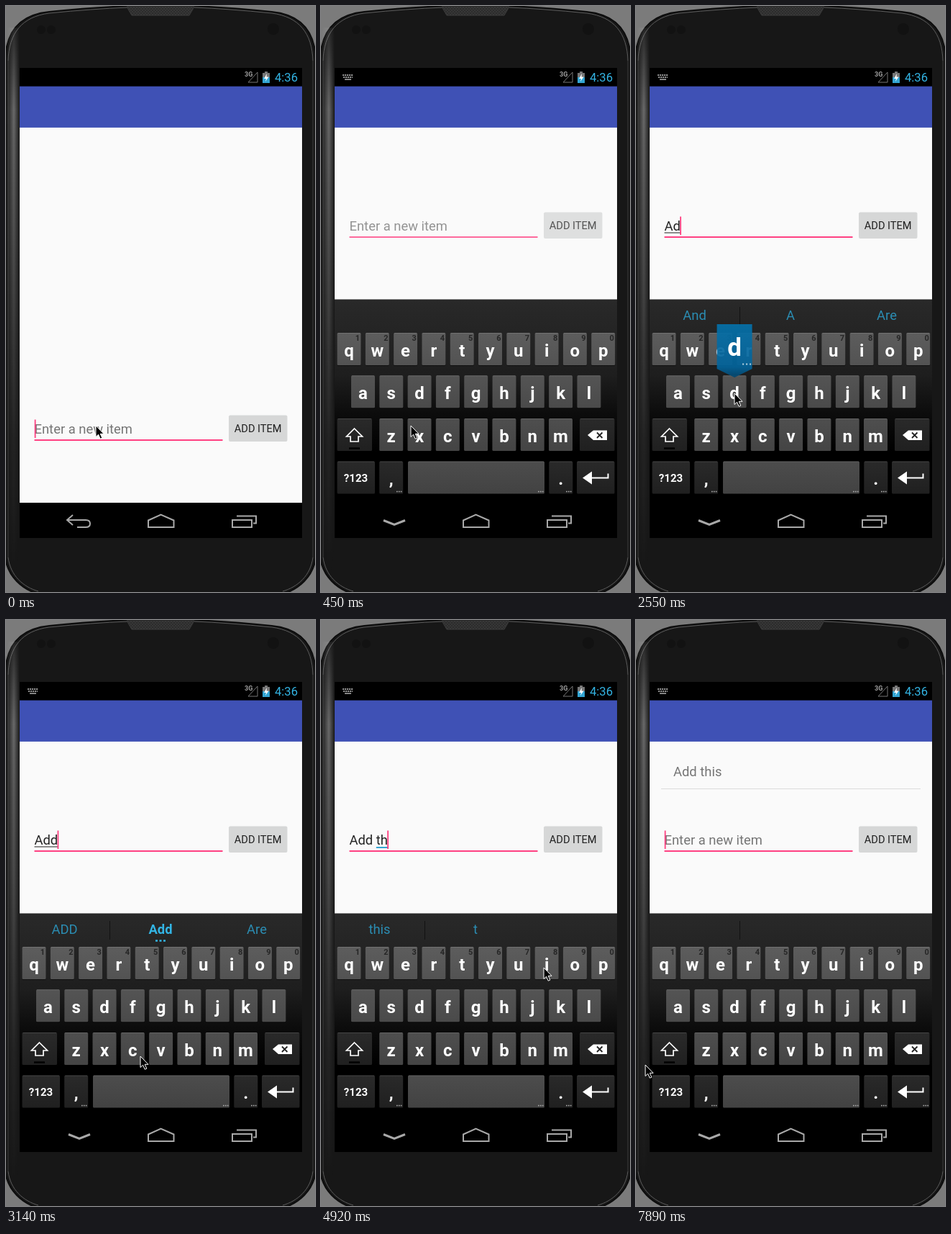
Animation, 430 px wide and 814 px high, one loop 8000 ms. Source, as an HTML page:

```html
<!DOCTYPE html>
<html lang="en">
<head>
<meta charset="utf-8">
<title>Adding a list item</title>
<style>
html, body { margin: 0; width: 100%; height: 100%; overflow: hidden; background: #7b7b7b; }
svg { display: block; }
text { font-family: Roboto, "Noto Sans", sans-serif; white-space: pre; }
.body { font-size: 18.4px; }
.hint { fill: #757575; }
.key { font-size: 24px; font-weight: 700; fill: #fff; text-anchor: middle; }
.num { font-size: 11px; font-weight: 700; fill: #262626; text-anchor: middle; }
.sug { font-size: 18.4px; fill: #2b8db3; text-anchor: middle; }
.nav { fill: none; stroke: #a9a9a9; stroke-width: 2; }
</style>
</head>
<body>
<svg id="stage" width="430" height="814" viewBox="0 0 430 814" xmlns="http://www.w3.org/2000/svg">
  <defs>
    <linearGradient id="sheen" x2="0" y2="1">
      <stop offset="0" stop-color="#fff" stop-opacity=".08"/>
      <stop offset=".15" stop-color="#fff" stop-opacity=".36"/>
      <stop offset=".4" stop-color="#fff" stop-opacity=".24"/>
      <stop offset=".75" stop-color="#fff" stop-opacity=".06"/>
      <stop offset="1" stop-color="#fff" stop-opacity="0"/>
    </linearGradient>
    <linearGradient id="side">
      <stop offset="0" stop-color="#000"/>
      <stop offset=".55" stop-color="#fff"/>
      <stop offset="1" stop-color="#000"/>
    </linearGradient>
    <mask id="sideMask"><rect x="1" y="30" width="18" height="760" fill="url(#side)"/></mask>
    <linearGradient id="board" x2="0" y2="1">
      <stop offset="0" stop-color="#292929"/>
      <stop offset=".37" stop-color="#1e1e1e"/>
      <stop offset=".56" stop-color="#0c0c0c"/>
      <stop offset=".75" stop-color="#000"/>
    </linearGradient>
    <linearGradient id="shade" x2="0" y2="1">
      <stop offset="0" stop-color="#fff" stop-opacity=".04"/>
      <stop offset="1" stop-color="#000" stop-opacity=".04"/>
    </linearGradient>
    <linearGradient id="bubble" x2="0" y2="1">
      <stop offset="0" stop-color="#0570a8"/>
      <stop offset=".8" stop-color="#03639a"/>
      <stop offset="1" stop-color="#05456b"/>
    </linearGradient>
    <pattern id="mesh" width="4" height="4" patternUnits="userSpaceOnUse">
      <rect width="4" height="4" fill="#2c2c2c"/>
      <path d="M0 0L4 4M4 0L0 4" stroke="#3a3a3a" stroke-width=".8"/>
    </pattern>
  </defs>

  <!-- phone -->
  <rect width="430" height="814" fill="#7b7b7b"/>
  <path d="M-1 72C1 34 20 12 60 8Q120 2 170 0H262Q310 2 370 8C410 12 429 34 431 72V766C428 793 407 810 385 817H45C23 810 2 793 -1 766Z" fill="#171717" stroke="#0d0d0d" stroke-width="2"/>
  <path d="M3 766V76M427 76V766" stroke="#3c3c3c"/>
  <path d="M3 76C4 38 22 15 60 10Q120 4 170 2M262 2Q310 4 370 10C408 15 426 38 427 76M427 766C424 791 406 807 385 813M3 766C6 791 24 807 45 813" fill="none" stroke="#5c5c5c"/>
  <rect x="1" y="30" width="18" height="760" fill="url(#sheen)" mask="url(#sideMask)"/>
  <path d="M168 1H262L255 13H175Z" fill="url(#mesh)" stroke="#3c3c3c"/>
  <g fill="#121212"><circle cx="49" cy="33" r="6"/><circle cx="63" cy="33" r="6"/><circle cx="372" cy="32" r="8"/></g>

  <!-- screen -->
  <rect x="19" y="86" width="393" height="653"/>
  <rect x="19" y="168" width="393" height="522" fill="#fafafa"/>
  <rect x="19" y="111.600" width="393" height="57.300" fill="#3f51b5"/>
  <g id="kbIcon" fill="none" stroke="#929292" stroke-width="1.8">
    <path d="M30 96H45M31 99H44" stroke-dasharray="2.200 .8"/><path d="M33 102H42"/>
  </g>
  <text x="332" y="98" font-size="9" font-weight="700" fill="#a0a0a0">3G</text>
  <path d="M350 92V106H337Z" fill="none" stroke="#777"/>
  <path d="M360 91H364V93H367V99H357V93H360Z" fill="#777"/>
  <rect x="357" y="99" width="10" height="8" fill="#33a5d3"/>
  <path d="M363 94L359 101H362L361 105L365.500 98.500H362.500Z" fill="#fff"/>
  <text x="374" y="105" font-size="16.600" fill="#33b5e5">4:36</text>

  <g id="item">
    <text class="body hint" x="52" y="217">Add this</text>
    <path d="M35 234.500H396" stroke="#dcdcdc"/>
  </g>
  <g id="form">
    <rect id="button" x="310" y="286.500" width="81.500" height="36.500" rx="2"/>
    <text x="350.700" y="310" font-size="14.600" fill="#212121" text-anchor="middle">ADD ITEM</text>
    <text id="hint" class="body hint" x="39.500" y="312">Enter a new item</text>
    <text id="value" class="body" x="39.500" y="312" fill="#222"></text>
    <rect id="mark"/>
    <rect x="39.500" y="320" width="262" height="2" fill="#ff4081"/>
    <rect id="caret" y="292.500" width="1.800" height="25.500" fill="#ff4081"/>
  </g>

  <svg x="19" y="407" width="393" height="283" viewBox="19 407 393 283"><g id="keys"></g></svg>

  <path id="back" class="nav" d="M93 707L85 714L93 721M85 714H111Q117 714 117 719T111 724H99"/>
  <path id="down" class="nav" d="M87 714.500L102 720.500L117 714.500" style="stroke-width:3"/>
  <path class="nav" d="M198 724V714.500L215.500 706.500L233.500 714.500V724Z"/>
  <path class="nav" d="M315 714H342V724H315ZM321 708.500H348V718.500H344"/>

  <g id="popup">
    <path d="M-24.500 442H24.500V504L0 516L-24.500 504Z" fill="url(#bubble)" opacity=".93"/>
    <text id="popChar" y="486" font-size="35" font-weight="700" fill="#fff" text-anchor="middle"></text>
    <path d="M11 497.500H23" stroke="#b9d3e0" stroke-width="2" stroke-dasharray="2 3"/>
  </g>
  <path id="mouse" d="M0 0V15.500L3.600 12.200L6.200 18.200L8.800 17.100L6.200 11.300H11Z" stroke="#fff"/>
</svg>
<script>
const $ = id => document.getElementById(id);
const LOOP = 8000, LEFT = 39.5, PITCH = 39.3;

function add(parent, tag, attrs, text) {
  const node = document.createElementNS("http://www.w3.org/2000/svg", tag);
  for (const name in attrs) node.setAttribute(name, attrs[name]);
  if (text) node.textContent = text;
  return parent.appendChild(node);
}
const show = (node, on) => node.setAttribute("visibility", on ? "visible" : "hidden");

// keyboard
const kb = $("keys"), letters = [], spots = {};
function key(x, y, w, fill) {
  const box = { x, y, width: w, height: 45, rx: 1.5 };
  add(kb, "rect", { ...box, y: y + 1, fill: "#000", opacity: .5 });
  const face = add(kb, "rect", { ...box, fill });
  add(kb, "rect", { ...box, fill: "url(#shade)" });
  add(kb, "path", { d: `M${x + 1} ${y + .5}h${w - 2}`, stroke: "#fff", opacity: .13 });
  return face;
}
const dots = (x, y = 674.5) => add(kb, "path", {
  d: `M${x} ${y}h7.500`, stroke: "#aaa", "stroke-width": 1.6, "stroke-dasharray": "1.7 1.2"
});

add(kb, "rect", { x: 19, y: 407.5, width: 393, height: 283, fill: "url(#board)" });
const divider = add(kb, "path", { d: "M144.500 418V444", stroke: "#121212" });
[["qwertyuiop", 22.5, 454, "#565656"], ["asdfghjkl", 42, 513.3, "#4d4d4d"], ["zxcvbnm", 81.2, 573, "#474747"]]
  .forEach(([row, left, top, fill], r) => [...row].forEach((ch, i) => {
    const x = left + i * PITCH, mid = x + 16.5;
    key(x, top, 33, fill);
    letters.push([add(kb, "text", { class: "key", x: mid, y: top + 32.5 }, ch), ch]);
    spots[ch] = [mid, top - 513.3];
    if (!r) add(kb, "text", { class: "num", x: mid + 12, y: 464.5 }, String((i + 1) % 10));
  }));

const DARK = "#212121";
key(22.5, 573, 48.5, DARK);
key(360, 573, 48.5, DARK);
key(22.5, 632.5, 52.5, DARK);
key(81.2, 632.5, 33, DARK);
const space = key(121, 632.5, 190, "#454545");
key(317.3, 632.5, 33, DARK);
key(356, 632.5, 52.5, DARK);
const shift = add(kb, "path", {
  d: "M46.500 587L57.500 598H52V605H41V598H35.500Z", stroke: "#fff", "stroke-width": 1.7
});
add(kb, "path", { d: "M39 614.500H54", stroke: "#000", "stroke-width": 2.5 });
add(kb, "path", { d: "M371 596L379 589.500H398V603H379Z", fill: "#fff" });
add(kb, "path", { d: "M384 592.500L391.500 600M391.500 592.500L384 600", stroke: "#222", "stroke-width": 1.8 });
add(kb, "text", { class: "key", x: 48.5, y: 661, style: "font-size:15px" }, "?123");
add(kb, "text", { class: "key", x: 97.7, y: 665 }, ",");
add(kb, "text", { class: "key", x: 333.8, y: 665 }, ".");
add(kb, "path", { d: "M364 655.500L377 646.500V664.500Z", fill: "#fff" });
add(kb, "path", { d: "M376 655.500H399.500V649.500", fill: "none", stroke: "#fff", "stroke-width": 2 });
[105, 302, 341].forEach(x => dots(x));
const enterDots = dots(399.5);
const words = [81.5, 215, 349].map(x => add(kb, "text", { class: "sug", x, y: 435.5 }));
const more = add(kb, "path", { d: "M208 445.500H222", stroke: "#33b5e5", "stroke-width": 2.6, "stroke-dasharray": "3 2.500" });

// each entry: tick, what changes from then on
const NONE = ["", "", ""];
const steps = [
  [0, { text: "", sug: NONE, strong: 0, caps: 0, pop: "", caret: 1, slide: 283, alpha: 0, fade: 1, up: 0, bar: 0, press: 0, item: 0, space: 0, dots: 0 }],
  [1, { slide: 140, alpha: .5 }],
  [2, { slide: 40, alpha: .85, up: 1, fade: .35, caret: 0 }],
  [3, { slide: 0, alpha: 1, fade: .77 }],
  [4, { fade: 1, caret: 1, bar: 1 }],
  [7, { caret: 0 }],
  [8, { caps: 1 }],
  [10, { caret: 1 }],
  [14, { text: "A", pop: "A", caps: 0 }],
  [15, { pop: "", sug: ["And", "A", "Are"] }],
  [17, { text: "Ad", pop: "d" }],
  [18, { pop: "", sug: ["Ad", "Add", "Are"], strong: 1 }],
  [19, { text: "Add", pop: "d" }],
  [20, { pop: "", sug: ["ADD", "Add", "Are"] }],
  [23, { text: "Add ", sug: NONE, strong: 0, space: 1 }],
  [24, { space: 0 }],
  [26, { text: "Add t", pop: "t" }],
  [27, { pop: "", sug: ["this", "t", ""] }],
  [30, { text: "Add th", pop: "h" }],
  [32, { pop: "" }],
  [34, { text: "Add thi", pop: "i" }],
  [35, { pop: "", sug: ["thi", "this", "tho"], strong: 1 }],
  [37, { caret: 0 }],
  [39, { caret: 1 }],
  [41, { text: "Add this", pop: "s" }],
  [42, { pop: "", sug: ["thus", "this", "those"] }],
  [44, { caret: 0 }],
  [47, { press: 1, caret: 1 }],
  [48, { text: "", sug: NONE, strong: 0, item: 1 }],
  [49, { press: 0, dots: 1 }]
];
// pointer: tick, x, y
const path = [
  [0, 125, 583], [7, 125, 583], [12, 58, 538], [15, 58, 538], [17, 137, 538], [20, 137, 538],
  [21, 187, 606], [22, 207, 641], [23, 214, 650], [24, 214, 650], [26, 196, 479], [27, 196, 479],
  [30, 255, 538], [31, 255, 538], [33, 310, 483], [35, 310, 483], [39, 99, 538], [41, 99, 538],
  [45, 355, 306], [51, 355, 306], [53, 13, 618]
];

const pen = document.createElement("canvas").getContext("2d");
function widthOf(text) {
  pen.font = '18.4px Roboto, "Noto Sans", sans-serif';
  return pen.measureText(text).width;
}

const tickTime = k => 150 * k - 10 * Math.max(0, Math.floor((k - 15) / 6));
function tickAt(ms) {
  let k = 53;
  while (k > 0 && tickTime(k) > ms) k--;
  return k;
}

function pointer(k) {
  const i = path.findIndex(p => p[0] >= k);
  const b = path[i], a = path[Math.max(0, i - 1)];
  const u = b === a ? 0 : (k - a[0]) / (b[0] - a[0]);
  const e = u * u * (3 - 2 * u);
  return [a[1] + (b[1] - a[1]) * e, a[2] + (b[2] - a[2]) * e];
}

function draw(k) {
  const s = Object.assign({}, ...steps.filter(p => p[0] <= k).map(p => p[1]));
  kb.setAttribute("transform", `translate(0 ${s.slide})`);
  kb.setAttribute("opacity", s.alpha);
  show($("kbIcon"), s.up);
  show($("down"), s.up);
  show($("back"), !s.up);
  show($("item"), s.item);
  show(divider, s.bar);
  show(enterDots, s.dots);
  show(more, s.strong);

  for (const [node, ch] of letters) node.textContent = s.caps ? ch.toUpperCase() : ch;
  shift.setAttribute("fill", s.caps ? "#fff" : "none");
  space.setAttribute("fill", s.space ? "#0873a8" : "#454545");
  words.forEach((node, i) => {
    const strong = s.strong && i === 1;
    node.textContent = s.sug[i];
    node.style.fontWeight = strong ? 700 : 400;
    node.style.fill = strong ? "#33b5e5" : "";
  });

  $("form").setAttribute("transform", `translate(0 ${s.up ? 0 : 282})`);
  $("form").setAttribute("opacity", s.fade);
  $("button").setAttribute("fill", s.press ? "#bdbdbd" : "#d6d7d7");
  $("value").textContent = s.text;
  show($("hint"), !s.text);
  show($("caret"), s.caret);
  const end = LEFT + widthOf(s.text);
  $("caret").setAttribute("x", s.text ? end - .7 : LEFT + .2);

  // underline below the word being typed
  const start = s.text.lastIndexOf(" ") + 1, from = LEFT + widthOf(s.text.slice(0, start));
  const mark = { x: from, y: start ? 315 : 314.5, width: Math.max(0, end - from), height: start ? 2 : 1, fill: start ? "#33a5d3" : "#222" };
  for (const name in mark) $("mark").setAttribute(name, mark[name]);

  show($("popup"), s.pop);
  if (s.pop) {
    const [x, y] = spots[s.pop.toLowerCase()];
    $("popup").setAttribute("transform", `translate(${x} ${y})`);
    $("popChar").textContent = s.pop;
  }
  $("mouse").setAttribute("transform", `translate(${pointer(k)})`);
}

let last = -1;
const began = performance.now();
function frame(now) {
  const k = tickAt(Math.max(0, now - began) % LOOP);
  if (k !== last) draw(last = k);
  requestAnimationFrame(frame);
}
draw(0);
requestAnimationFrame(frame);
</script>
</body>
</html>
```
